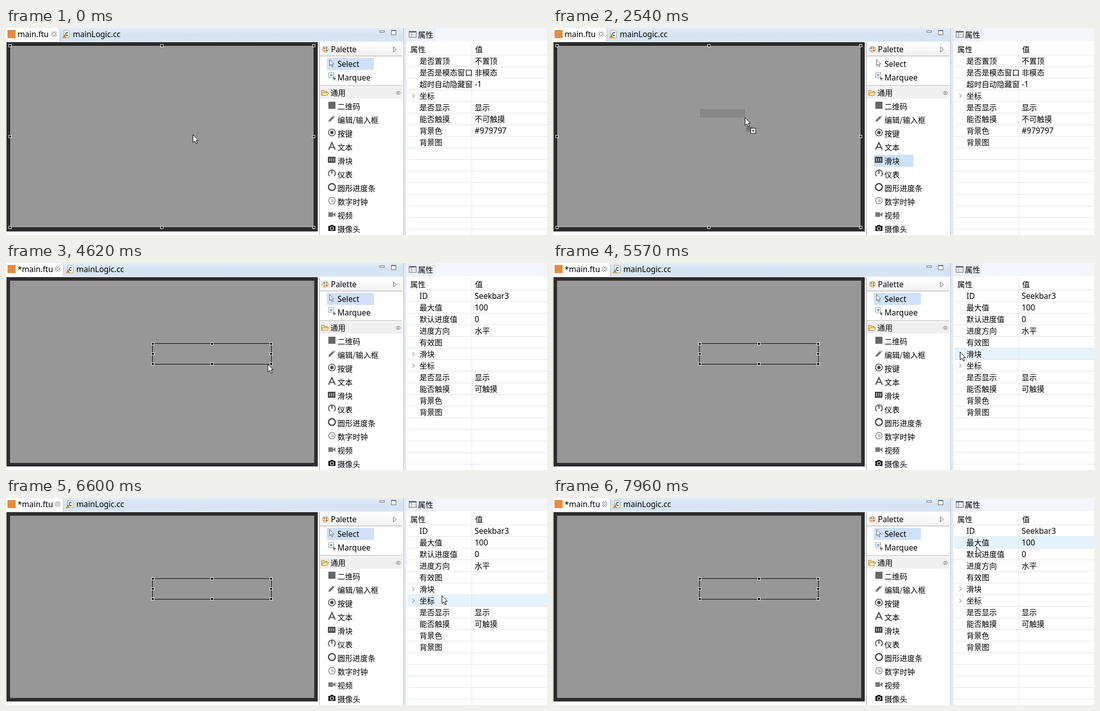
Recreate the animation shown at these times as an HTML page with a canvas. Size 1069x410 px, loop 8000 ms.

```html
<!DOCTYPE html>
<html lang="zh">
<head>
<meta charset="utf-8">
<title>UI editor</title>
<style>
html, body { margin: 0; width: 100%; height: 100%; overflow: hidden; background: #fff; }
canvas { display: block; width: 1069px; height: 410px; }
</style>
</head>
<body>
<canvas id="stage" width="1069" height="410"></canvas>
<script>
const ctx = document.getElementById('stage').getContext('2d');
const LOOP = 8000, TICK = 65;
const PICK = 1510, PRESS = 2340, DROP = 3740, EDGE = 3990, LEAVE = 4420;

const linear = u => u;
const easeIn = u => 1 - Math.cos(u * Math.PI / 2);
const easeOut = u => Math.sin(u * Math.PI / 2);
const easeBoth = u => (1 - Math.cos(u * Math.PI)) / 2;

// Pointer moves: first step, last step, easing, end x, end y
const moves = [
  [0, 0, linear, 369, 211],
  [280, 1130, easeBoth, 645, 262],
  [1630, 2290, easeBoth, 291, 161],
  [PRESS, 3310, easeOut, 522, 203],
  [3490, 3490, linear, 525, 201],
  [EDGE, EDGE, linear, 521, 201],
  [LEAVE, LEAVE, linear, 519, 201],
  [4620, 5070, easeBoth, 458, 177],
  [5430, 5570, linear, 804, 176],
  [5635, 5950, easeOut, 826, 90],
  [6200, 6600, easeIn, 861, 193],
  [6670, 7050, linear, 856, 288],
  [7120, 7630, easeIn, 846, 197],
  [7700, 7960, easeOut, 836, 96]
];

// The pointer advances in even steps, the first one at the start of a move
function pointerAt(t) {
  const i = moves.filter(m => m[0] <= t).length - 1;
  const [start, end, ease, x, y] = moves[i];
  const [, , , x0, y0] = moves[Math.max(0, i - 1)];
  const gaps = Math.round((end - start) / TICK);
  const step = gaps ? Math.floor((t - start) / (end - start) * gaps + 1e-6) + 1 : 1;
  const u = ease(Math.min(1, step / (gaps + 1)));
  return [Math.round(x0 + (x - x0) * u), Math.round(y0 + (y - y0) * u)];
}

function box(x, y, w, h, fill) { ctx.fillStyle = fill; ctx.fillRect(x, y, w, h); }
function frame(x, y, w, h, color) {
  ctx.strokeStyle = color; ctx.lineWidth = 1;
  ctx.strokeRect(x + .5, y + .5, w - 1, h - 1);
}
function dashed(on, off, draw) {
  ctx.setLineDash([on, off]); draw(); ctx.setLineDash([]);
}
function fade(y, h, ...colors) {
  const g = ctx.createLinearGradient(0, y, 0, y + h);
  colors.forEach((c, i) => g.addColorStop(i / (colors.length - 1), c));
  return g;
}
function text(s, x, cy) {
  const latin = /^[\x20-\x7e]*$/.test(s);
  ctx.font = latin ? '15.5px "Noto Sans", "Open Sans", sans-serif'
    : '15px "Noto Sans CJK SC", "Noto Sans CJK", sans-serif';
  ctx.fillStyle = '#000';
  ctx.fillText(s, x, cy + 6);
}
function poly(points, fill, line, width = 1, open) {
  ctx.beginPath();
  points.forEach(p => ctx.lineTo(p[0], p[1]));
  if (!open) ctx.closePath();
  if (fill) { ctx.fillStyle = fill; ctx.fill(); }
  if (line) { ctx.strokeStyle = line; ctx.lineWidth = width; ctx.stroke(); }
}
function arc(x, y, r, line, width, fill, a = 0, b = 2 * Math.PI) {
  ctx.beginPath();
  ctx.arc(x, y, r, a, b);
  if (fill) { ctx.fillStyle = fill; ctx.fill(); }
  if (line) { ctx.strokeStyle = line; ctx.lineWidth = width; ctx.stroke(); }
}
function at(x, y, draw) {
  ctx.save(); ctx.translate(x, y); draw(); ctx.restore();
}

const ARROW = [[.5, .5], [.5, 16], [4, 12.6], [6.6, 18.4], [9, 17.4], [6.5, 11.8], [11, 11.6]];
const DARK = '#4a4a4a';

const items = [
  ['二维码', () => box(-7, -7, 14, 14, '#666')],
  ['编辑/输入框', () => {
    poly([[-7, 6], [-6, 2], [2, -6], [5, -3], [-3, 5]], '#777');
    poly([[3, -7], [7, -5], [6, -4]], '#777');
  }],
  ['按键', () => { arc(0, 0, 6.8, DARK, 1.6); arc(0, 0, 3.4, null, 0, DARK); }],
  ['文本', () => {
    poly([[-6.5, 7], [0, -7], [6.5, 7]], null, DARK, 2.2, true);
    box(-4, 1.5, 8, 2, DARK);
  }],
  ['滑块', () => {
    box(-8, -6, 15, 12, DARK);
    for (let x = -5; x <= 3; x += 4) box(x, -3, 1, 6, '#fff');
  }],
  ['仪表', () => {
    arc(0, 0, 6.8, DARK, 1.8, null, Math.PI * .7, Math.PI * 2.3);
    box(-1, -7, 2, 8, DARK);
  }],
  ['圆形进度条', () => arc(0, 0, 6.8, '#222', 2)],
  ['数字时钟', () => {
    arc(0, 0, 6.5, '#888', 1.5);
    poly([[0, -4], [0, 1], [4, 1]], null, '#888', 1.3, true);
  }],
  ['视频', () => {
    box(-7, -4, 9, 9, '#777');
    poly([[2, 0], [7, -4], [7, 5], [2, 1]], '#777');
  }],
  ['摄像头', () => {
    box(-7, -4, 14, 10, '#111'); box(-3, -6, 6, 3, '#111');
    arc(0, 1, 3.2, '#fff', 1.3);
  }]
];

// Name, value, expandable
const rootProps = [['是否置顶', '不置顶'], ['是否是模态窗口', '非模态'], ['超时自动隐藏窗', '-1'], ['坐标', '', true],
  ['是否显示', '显示'], ['能否触摸', '不可触摸'], ['背景色', '#979797'], ['背景图', '']];
const barProps = [['ID', 'Seekbar3'], ['最大值', '100'], ['默认进度值', '0'], ['进度方向', '水平'], ['有效图', ''],
  ['滑块', '', true], ['坐标', '', true], ['是否显示', '显示'], ['能否触摸', '可触摸'], ['背景色', ''], ['背景图', '']];

function tabs(dirty) {
  const d = dirty ? 7 : 0;
  box(0, 0, 785, 27, fade(0, 27, '#e3edf9', '#d4e2f2', '#d8e5f4'));
  poly([[0, 0], [101 + d, 0], [106 + d, 5], [106 + d, 27], [0, 27]], '#fff');
  box(106 + d, 4, 1, 23, '#b6bccc');
  box(3, 4, 16, 16, '#e98b3f');
  text(dirty ? '*main.ftu' : 'main.ftu', 23, 12);
  at(95 + d, 12, () => {
    for (const [color, width] of [['#777', 4], ['#fff', 2]])
      for (const s of [-1, 1]) poly([[-4, -4 * s], [4, 4 * s]], null, color, width, true);
  });
  at(119 + d, 12, () => {
    poly([[-4.5, -7.5], [3.5, -7.5], [6.5, -4.5], [6.5, 7.5], [-4.5, 7.5]], '#fff', '#b39a55');
    arc(1.5, 0, 2.8, '#3465a4', 1.8, null, .8, 5.5);
    poly([[-7, 7.5], [-3.5, 1], [0, 7.5]], '#f5c23b', '#b98518');
    box(-4, 3, 1, 3, '#333');
  });
  text('mainLogic.cc', 132 + d, 12);
  for (const [x, y, w, h] of [[738, 5, 10, 4], [761, 4, 10, 10]]) {
    box(x, y, w, h, '#fff'); frame(x, y, w, h, '#666');
  }
  box(761, 5, 10, 1, '#666');
}

function handles(left, top, right, bottom) {
  const xs = [left, (left + right) / 2, right], ys = [top, (top + bottom) / 2, bottom];
  frame(left - 1, top - 1, right - left + 2, bottom - top + 2, '#000');
  xs.forEach((x, i) => ys.forEach((y, j) => {
    if (i === 1 && j === 1) return;
    box(x - 3, y - 3, 6, 6, '#fff');
    box(x - 2, y - 2, 4, 4, '#000');
  }));
}

function palette(picked, hovered) {
  box(619, 28, 1, 382, '#a5a5a5');
  box(620, 29, 163, 26, fade(29, 26, '#fff', '#f1f1f1'));
  box(620, 55, 163, 1, '#a8a8a8');
  at(631, 42, () => {
    arc(0, 0, 6, '#c58b55', 1, '#f8e3cc');
    ['#3f78c9', '#4c9a43', '#d3392f', '#e8a33a'].forEach((c, i) => {
      const a = i * Math.PI / 2 - 2.4;
      arc(3.3 * Math.cos(a), 3.3 * Math.sin(a), 1.6, null, 0, c);
    });
  });
  text('Palette', 642, 42);
  poly([[765.5, 37.5], [771.5, 42.5], [765.5, 47.5]], '#fff', '#666');
  if (!picked) box(634, 59, 93, 24, '#cfe1fa');
  at(639, 62, () => {
    ctx.scale(.8, .8);
    poly(ARROW, '#fff', '#555', 1.2);
  });
  text('Select', 655, 71);
  dashed(2, 2, () => frame(637, 88, 11, 11, '#333'));
  box(640, 91, 5, 5, '#8fb4dd');
  box(646, 100, 6, 1, '#222'); box(648, 97, 1, 7, '#222');
  text('Marquee', 655, 98);
  box(620, 114, 163, 1, '#a8a8a8');
  box(620, 117, 163, 23, '#f0f0f0');
  at(630, 128, () => {
    poly([[-6.5, 5.5], [-6.5, -4.5], [-1.5, -4.5], [0, -2.5], [4.5, -2.5], [4.5, 5.5]], '#f6d487', '#b58231');
    poly([[-6.5, 5.5], [-3, 0], [7.5, 0], [4.5, 5.5]], '#fde9ae', '#b58231');
  });
  text('通用', 641, 128);
  for (const s of [-1, 1])
    poly([[775 + s, 125], [775 + 5 * s, 128.5], [775 + s, 132]], '#fff', '#777');
  if (picked || hovered) box(634, 251, 78, 24, '#cfe1fa');
  items.forEach(([name, icon], i) => {
    const y = 155 + 27 * i;
    at(644, y - 2, icon);
    text(name, 655, y);
  });
}

function properties(rows, hover) {
  box(785, 0, 1, 410, '#b6bccc');
  box(786, 0, 5, 410, '#e4e9f6');
  box(791, 0, 278, 26, '#f4f6fb');
  box(791, 0, 58, 27, '#edf0f7');
  box(791, 27, 278, 383, '#fff');
  box(796, 6, 15, 13, '#fff'); frame(796, 6, 15, 13, '#606a78');
  box(796, 6, 15, 3, '#606a78');
  box(801, 9, 1, 9, '#8994a3');
  for (const y of [12, 15]) box(798, y, 12, 1, '#b2bac5');
  text('属性', 814, 13);
  if (hover >= 0) box(793, 54 + 23 * hover, 276, 22, '#e5f3ff');
  for (let y = 53; y < 410; y += 23) box(793, y, 276, 1, '#e4e4e4');
  box(920, 30, 1, 380, '#e4e4e4');
  text('属性', 799, 42);
  text('值', 927, 42);
  rows.forEach(([name, value, nested], i) => {
    const y = 65 + 23 * i;
    if (nested) poly([[803, y - 3.5], [807, y + .5], [803, y + 4.5]], null, '#999', 1.2, true);
    ctx.save();
    ctx.beginPath(); ctx.rect(793, y - 12, 128, 24); ctx.clip();
    text(name, 817, y);
    ctx.restore();
    text(value, 926, y);
  });
}

function pointer(x, y, adding, resizing) {
  at(x, y, () => {
    if (resizing) {
      const half = [[-5, -3.5], [-7.5, -1.5], [-7.5, -7.5], [-1.5, -7.5], [-3.5, -5]];
      poly([...half, ...half.map(([a, b]) => [-a, -b])], '#fff', '#000');
      return;
    }
    if (adding) {
      for (let j = 18; j < 28; j++)
        for (let i = 3 + j % 2; i < 15; i += 2) box(i, j, 1, 1, '#555');
      box(11, 21, 11, 11, '#fff'); frame(11, 21, 11, 11, '#000');
      box(14, 26, 5, 1, '#000'); box(16, 24, 1, 5, '#000');
    }
    poly(ARROW, '#fff', '#000');
  });
}

function draw(t) {
  const [x, y] = pointerAt(t);
  const made = t >= DROP, picked = t >= PICK && !made;
  const overSlider = x >= 634 && x < 712 && y >= 251 && y < 275;
  box(0, 0, 1069, 410, '#fff');
  tabs(made);
  box(1, 28, 615, 375, '#2d2d2d');
  box(8, 35, 601, 361, '#979797');
  if (made) handles(290, 160, 524, 200);
  else handles(8, 35, 608, 395);
  if (picked && t >= PRESS) {
    const w = x - 291, h = y - 161;
    box(291, 161, w, h, '#898989');
    dashed(3, 2, () => frame(291, 161, w, h, '#747474'));
  }
  palette(picked, overSlider);
  properties(made ? barProps : rootProps, made && x >= 793 ? Math.floor((y - 54) / 23) : -1);
  pointer(x, y, picked && x < 616, t >= EDGE && t < LEAVE);
}

const start = performance.now();
function tick() {
  draw((performance.now() - start) % LOOP);
  requestAnimationFrame(tick);
}
tick();
</script>
</body>
</html>
```
